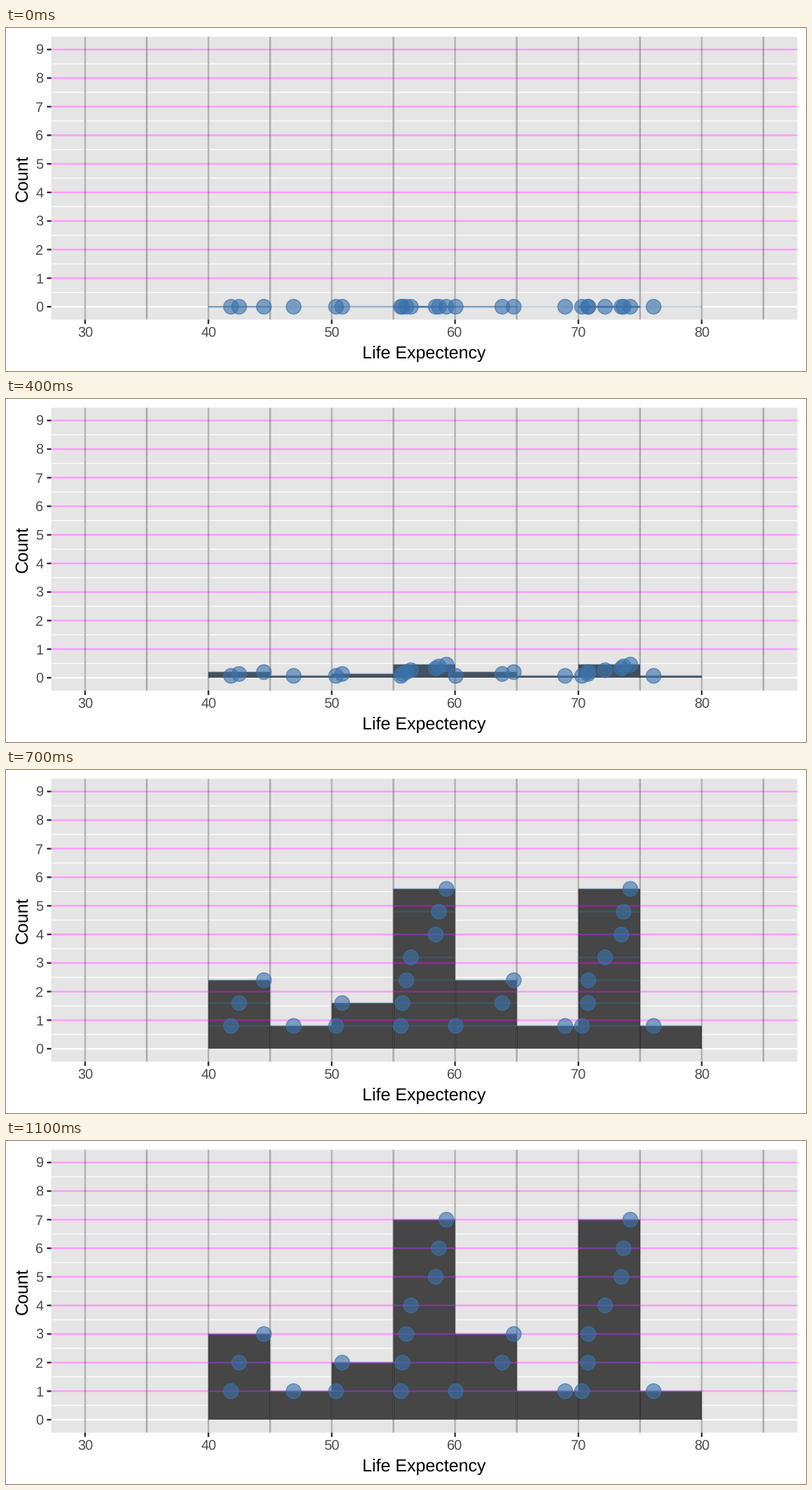
These frames come from a looping animation (1143x490 px, 2500 ms). A matplotlib script:

```python
import matplotlib.pyplot as plt
from matplotlib.animation import FuncAnimation
from matplotlib.patches import Circle, Rectangle

W, H, DPI = 1143, 490, 128
PX = 72 / DPI                      # points per pixel
LEFT, RIGHT, TOP, BOTTOM = 64.7, 1130.5, 12.5, 416.6
THICK, THIN = 2.42, 1.21
BLUE = "#3a72ab"
STEPS = 12                         # frames the rise takes

LIVES = [41.83, 42.49, 44.50, 46.91, 50.35, 50.85, 55.61, 55.73, 56.05,
         56.42, 58.43, 58.69, 59.30, 60.05, 63.83, 64.76, 68.93, 70.30,
         70.78, 70.81, 72.17, 73.49, 73.67, 74.21, 76.10]

plt.rcParams["font.family"] = "Liberation Sans"
plt.rcParams["text.hinting"] = "none"
plt.rcParams["text.hinting_factor"] = 1

fig = plt.figure(figsize=(W / DPI, H / DPI), dpi=DPI, facecolor="white")
ax = fig.add_axes([0, 0, 1, 1])
ax.set_xlim(0, W)
ax.set_ylim(H, 0)
ax.axis("off")


def px(life):
    return 113 + (life - 30) * 17.62


def py(count):
    return 398.2 - count * 40.83


def line(x0, y0, x1, y1, color, width, z, alpha=1):
    return ax.plot([x0, x1], [y0, y1], color=color, lw=width * PX, alpha=alpha,
                   solid_capstyle="butt", snap=False, zorder=z)[0]


def label(x, y, text, size, color, **kw):
    ax.text(x, y, text, fontsize=size * PX, color=color, va="baseline", **kw)


def box(x, y, w, h, color, z):
    return ax.add_patch(Rectangle((x, y), w, h, fc=color, lw=0, snap=False, zorder=z))


def ease(t):
    """Quintic in and out."""
    t = min(t, 1)
    return 16 * t**5 if t < 0.5 else 1 - 16 * (1 - t)**5


# Panel, grid and axes
box(LEFT, TOP, RIGHT - LEFT, BOTTOM - TOP, "#e5e5e5", 0)
for k in range(9):
    line(LEFT, py(k + 0.5), RIGHT, py(k + 0.5), "white", THIN, 1)
for life in range(30, 90, 5):
    major = life % 10 == 0
    x = px(life)
    line(x, TOP, x, BOTTOM, "white", THICK if major else THIN, 1)
    line(x, TOP, x, BOTTOM, "black", THICK, 4, 0.3)
    if major:
        line(x, BOTTOM, x, BOTTOM + 6.2, "#333333", THICK, 4)
        label(x, 442.2, str(life), 20, "#4d4d4d", ha="center")
for k in range(10):
    y = py(k)
    line(LEFT, y, RIGHT, y, "white", THICK, 2)
    if k:
        line(LEFT, y, RIGHT, y, "magenta", THICK, 5, 0.4)
    line(LEFT - 6.2, y, LEFT, y, "#333333", THICK, 4)
    label(53.5, y + 7.2, str(k), 20, "#4d4d4d", ha="right")
label(597.6, 472.2, "Life Expectency", 25, "black", ha="center")
label(30.3, 214.5, "Count", 25, "black", ha="center",
      rotation=90, rotation_mode="anchor")

# Each life adds one level to the stack of its five-year bin
counts = {}
dots = []
for life in LIVES:
    start = int(life // 5) * 5
    counts[start] = level = counts.get(start, 0) + 1
    cap = line(px(start), py(0), px(start + 5), py(0), BLUE, THICK, 6, 0.3)
    dot = ax.add_patch(Circle((px(life), py(0)), 10.5, fc=BLUE, ec=BLUE,
                              lw=1.6 * PX, alpha=0.62, zorder=7))
    dots.append((level, cap, dot))
bars = [(n, box(px(start), py(0), px(start + 5) - px(start), 0, "#464646", 3))
        for start, n in counts.items()]


def draw(i):
    s = ease(i / STEPS)
    for n, bar in bars:
        bar.set_y(py(n * s))
        bar.set_height(py(0) - py(n * s))
    for level, cap, dot in dots:
        y = py(level * s)
        cap.set_ydata([y, y])
        dot.center = dot.center[0], y
    return []


anim = FuncAnimation(fig, draw, frames=25, interval=100, init_func=lambda: draw(0),
                     repeat=True, repeat_delay=0)
plt.show()
```
